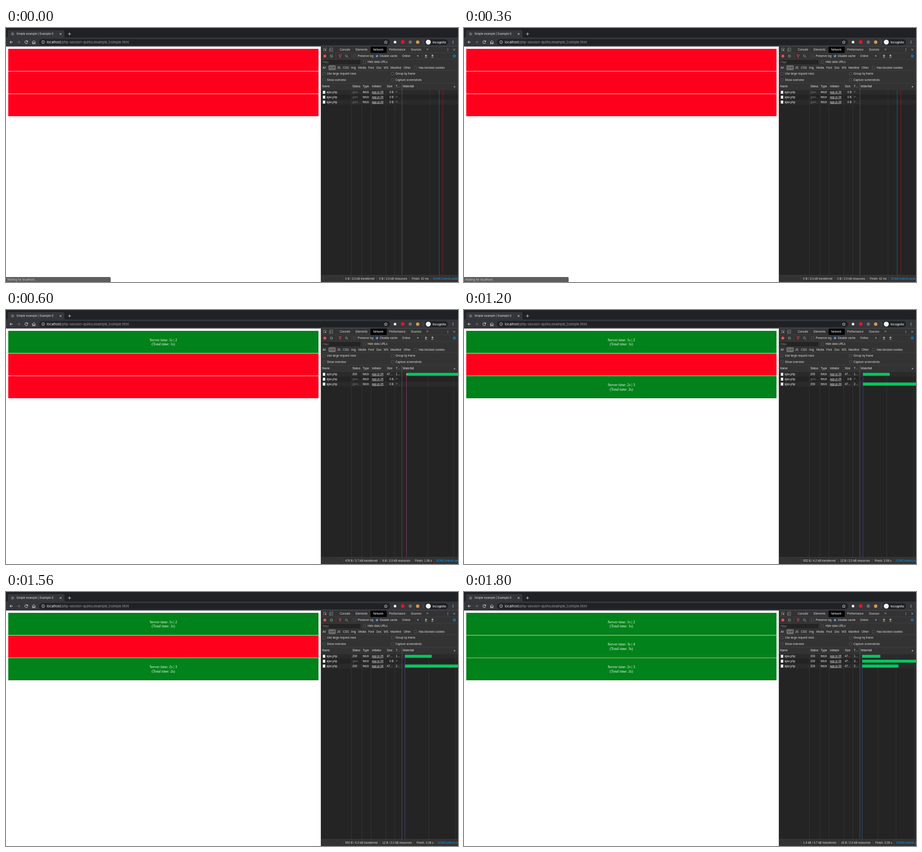
Animation, 998 px wide and 561 px high, one loop 2400 ms. Source, as an HTML page:

```html
<!DOCTYPE html>
<html lang="en">
<head>
<meta charset="utf-8">
<title>Session example</title>
<style>
html, body { margin: 0; width: 100%; height: 100%; overflow: hidden; background: #fff; }
svg { display: block; width: 998px; height: 561px; }
text { white-space: pre; }
.ui { font-family: Inter, sans-serif; }
.dev { font-family: "Liberation Sans", Arial, sans-serif; font-size: 6.28px; }
.page { font-family: "Liberation Serif", Times, serif; font-size: 8.36px; text-anchor: middle; }
.state { opacity: 0; animation: show 2.4s step-end infinite; }
@keyframes show { 0% { opacity: 1; } 25%, 100% { opacity: 0; } }
</style>
</head>
<body>
<svg id="stage" viewBox="0 0 998 561"></svg>
<script>
const rect = (x, y, w, h, fill, r = 0) =>
  `<rect x="${x}" y="${y}" width="${w}" height="${h}" fill="${fill}" rx="${r}"/>`;
const dot = (x, y, r, fill) => `<circle cx="${x}" cy="${y}" r="${r}" fill="${fill}"/>`;
const ring = (x, y, r, color, w = 0.8) =>
  `<circle cx="${x}" cy="${y}" r="${r}" fill="none" stroke="${color}" stroke-width="${w}"/>`;
const line = (d, color, w = 1) =>
  `<path d="${d}" fill="none" stroke="${color}" stroke-width="${w}"/>`;
const shape = (d, fill) => `<path d="${d}" fill="${fill}"/>`;
const text = (x, y, str, fill = '#dcdcdc', cls = 'dev', more = '') =>
  `<text x="${x}" y="${y}" fill="${fill}" class="${cls}" ${more}>${str}</text>`;
const ui = (x, y, str, size, fill, weight = 400) =>
  text(x, y, str, fill, 'ui', `font-size="${size}" font-weight="${weight}"`);
const vline = (x, y1, y2, color, w = 0.7) => rect(x, y1, w, y2 - y1, color);
const dots = (x, y, gap, fill) => [-gap, 0, gap].map(d => dot(x, y + d, 0.75, fill)).join('');
const cross = (x, y, r, color) =>
  line(`M${x - r} ${y - r}l${2 * r} ${2 * r}m0 ${-2 * r}l${-2 * r} ${2 * r}`, color, 0.9);
const box = (x, y) =>
  `<rect x="${x - 2.7}" y="${y - 2.7}" width="5.4" height="5.4" rx=".8" fill="#2c2c2c" stroke="#777" stroke-width=".6"/>`;
const check = (x, y, label) => box(x, y) + text(x + 6.6, y + 2.2, label);

const ICON = '#e8eaed', GREY = '#9aa0a6', DIM = '#7c7c7c', BAR = '#35363a', DARK = '#202124';
const RED = '#ff001c', GREEN = '#02821a', BLUE = '#0b84d8';
const rowY = i => 142 + 10.8 * i;
const boxY = i => 46 + 49.9 * i;

function browser() {
  return rect(0, 0, 998, 21.5, DARK) + rect(0, 21, 998, 19.6, BAR) + rect(0, 40.4, 998, 0.6, '#26272a') +
    shape('M0 21.5q4 0 4-4v-9q0-4 4-4h117q4 0 4 4v9q0 4 4 4z', BAR) +
    dot(14.5, 13.2, 3.4, '#62656a') +
    ui(23, 15.3, 'Simple example | Example 0', 6.15, '#e3e5e8') +
    cross(120.6, 13.1, 2, ICON) + line('M137 13.1h6.4m-3.2-3.2v6.4', ICON, 0.9) +
    line('M15 31.2h-6.4m3.1-3.1l-3.1 3.1l3.1 3.1', ICON) +
    line('M24.6 31.2h6.4m-3.1-3.1l3.1 3.1l-3.1 3.1', '#77797d') +
    line('M47.3 29a3.2 3.2 0 1 0 .6 3.2', ICON) + shape('M48.3 27.4v3.3h-3.3z', ICON) +
    line('M57.3 31.4l4-3.6l4 3.6m-6.8-.6v4.2h2v-2.6h1.7v2.6h2v-4.2', ICON, 0.9) +
    rect(73, 24.4, 775, 13.6, DARK, 6.8) +
    ring(82, 31.2, 3.3, ICON) + rect(81.6, 30.7, 0.8, 2.4, ICON) + rect(81.6, 29.1, 0.8, 0.8, ICON) +
    ui(90, 33.7, `localhost<tspan fill="${GREY}">/php-session-quirks/example_1/simple.html</tspan>`, 7.33, '#f1f3f4') +
    line('M838.6 27.8l1 2.3l2.5.2l-1.9 1.7l.6 2.5l-2.2-1.3l-2.2 1.3l.6-2.5l-1.9-1.7l2.5-.2z', ICON, 0.75) +
    dot(859, 31.2, 2.9, '#f0f0f0') + dot(876, 31.1, 4, '#e5122b') +
    dot(892.6, 31.2, 3.6, '#6b6d70') + dot(909, 31.2, 3.7, '#d99a4a') +
    vline(920.7, 26.5, 36, '#5c5e62') +
    rect(925, 24.4, 51, 13.6, DARK, 6.8) + dot(932.4, 31.2, 5.5, '#f1f3f4') +
    ui(942, 33.6, 'Incognito', 6.65, '#f1f3f4', 500) + dots(987, 31.2, 2.4, ICON);
}

function toolbars() {
  const tabs = [[737, 'Console'], [772, 'Elements'], [846, 'Performance'], [894, 'Sources']];
  const types = [[699, 'All'], [731, 'JS'], [744, 'CSS'], [762, 'Img'], [778, 'Media'], [800, 'Font'],
    [818, 'Doc'], [834, 'WS'], [849, 'Manifest'], [878, 'Other']];
  const put = y => ([x, s]) => text(x, y, s);
  const C = '#a8a8a8';
  return rect(695, 41, 303, 520, '#333') + rect(695, 41, 0.8, 520, '#4c4c4c') +
    [55, 69, 94, 122].map(y => rect(695.8, y - 0.3, 303, 0.6, '#464646')).join('') +
    line('M703 50.7h-1.7v-6h6v1.8', C, 0.7) + shape('M703.7 46.7l4 1.5l-1.7.8l1.3 1.6l-.8.6l-1.2-1.7l-1 1.2z', C) +
    line('M715.2 47.5v-3.2h6v7h-2', C, 0.7) + line('M714.2 47.4h3.6v4.2h-3.6z', C, 0.7) +
    rect(805, 41, 35.5, 14, '#000') + text(810.5, 50.2, 'Network', '#fff') +
    tabs.map(put(50.2)).join('') + text(928, 50, '»', C, 'dev', 'style="font-size:9px"') +
    dots(975.5, 48, 2.2, C) + cross(989.7, 47.9, 2.2, C) +
    dot(704, 62, 3.2, '#ee4b55') + ring(718.5, 62, 2.8, C) + line('M716.6 60.1l3.8 3.8', C, 0.8) +
    vline(728, 57.5, 66.5, '#4a4a4a') +
    line('M734.6 59.2h6.2l-2.3 2.9v3l-1.6-.8v-2.2z', '#ee4b55', 0.9) +
    ring(751.3, 61.3, 2.2, C) + line('M753 63l2.4 2.4', C) + vline(763, 57.5, 66.5, '#4a4a4a') +
    check(769.8, 61.9, 'Preserve log') +
    rect(816.2, 59, 5.8, 5.8, '#2f6fb5', 0.8) + line('M817.5 62l1.2 1.3l2.1-3', '#fff', 0.8) +
    text(825.2, 64.1, 'Disable cache') + text(874.6, 64.1, 'Online') +
    shape('M907.2 60.5h4.2l-2.1 3.2z', C) + vline(918, 57.5, 66.5, '#4a4a4a') +
    shape('M927.3 58.4l3 3.2h-1.9v2h-2.2v-2h-1.9zM924.6 64.5h5.4v.9h-5.4z', C) +
    shape('M941.6 63.6l3-3.2h-1.9v-2h-2.2v2h-1.9zM938.9 64.5h5.4v.9h-5.4z', C) +
    ring(989.8, 61.8, 2, BLUE, 1.3) +
    `<circle cx="989.8" cy="61.8" r="3.1" fill="none" stroke="${BLUE}" stroke-width="1.2" stroke-dasharray="1.2 1.235"/>` +
    rect(697, 70.4, 85.5, 9.8, '#242424') + text(699, 77.6, 'Filter', '#858585') +
    check(791.6, 75.2, 'Hide data URLs') +
    rect(712, 82.6, 16, 10.2, '#747474', 2) + text(713.6, 90, 'XHR', '#292929') +
    vline(708.7, 84, 92, '#484848', 0.5) + types.map(put(90)).join('') +
    check(904.6, 87.7, 'Has blocked cookies') +
    check(702, 101, 'Use large request rows') + check(853.5, 101, 'Group by frame') +
    check(702, 114.6, 'Show overview') + check(853.5, 114.6, 'Capture screenshots');
}

function table() {
  const heads = [[698, 'Name'], [764.7, 'Status'], [787.8, 'Type'], [808, 'Initiator'], [841, 'Size'],
    [860.7, 'T…'], [876, 'Waterfall']];
  let out = rect(695.8, 136.6, 303, 409.4, '#242424') + rect(695.8, 136.2, 303, 0.6, '#484848');
  for (let i = 0; i < 3; i++) {
    const y = rowY(i);
    out += rect(695.8, y - 5.4, 303, 10.8, i % 2 ? '#232323' : '#2a2a2a') +
      rect(699.6, y - 3.3, 5.2, 6.6, '#f4f4f4') + text(707.8, y + 2.1, 'ajax.php', '#eee') +
      text(787.8, y + 2.1, 'fetch', '#eee') +
      text(808, y + 2.1, 'app.js:26', '#e4e4e4', 'dev', 'text-decoration="underline"');
  }
  return out + heads.map(([x, s]) => text(x, 131.3, s, '#e4e4e4')).join('') +
    shape('M988.3 130.9h4l-2-3.6z', '#a0a0a0') +
    [762, 785, 805.6, 838, 858].map(x => vline(x, 122.5, 546, '#3b3b3b')).join('') +
    vline(873.8, 122.5, 546, '#6a6a6a') +
    rect(695.8, 546, 303, 15, '#333') + rect(695.8, 545.7, 303, 0.6, '#484848');
}

// done: per box, seconds taken and reply number; null while pending
const first = [1, 2], second = [3, 4], third = [2, 3];
const states = [
  { done: [null, null, null], grid: [935.8], marks: [[956, '#0a72bd'], [964.3, '#a3161c']],
    foot: [['0 B / 3.3 kB transferred', 749], ['0 B / 2.0 kB resources', 824], ['Finish: 42 ms', 896]], load: 942.5 },
  { done: [first, null, null], start: 884.5, unit: 114, grid: [930.8, 987.8],
    marks: [[883.7, '#3b4fa0'], [884.2, '#a02a48']],
    foot: [['476 B / 3.7 kB transferred', 749], ['6 B / 2.0 kB resources', 831], ['Finish: 1.08 s', 903]], load: 949.5 },
  { done: [first, null, third], start: 881, unit: 59, grid: [933, 992.5], marks: [[880.5, '#4a4aa8']],
    foot: [['952 B / 4.2 kB transferred', 749], ['12 B / 2.0 kB resources', 831], ['Finish: 2.08 s', 906.5]], load: 953 },
  { done: [first, second, third], start: 879.3, unit: 40, grid: [913.3, 953.7, 994], marks: [[878.7, '#2c5ea8']],
    foot: [['1.4 kB / 4.7 kB transferred', 749], ['18 B / 2.0 kB resources', 832.5], ['Finish: 3.09 s', 908]], load: 954.5 }
];

function reply(i, [secs, n]) {
  const y = boxY(i);
  return rect(5, y, 685, 49, GREEN) +
    text(347.5, y + 22.5, `Server time: ${secs}s | ${n}`, '#fff', 'page') +
    text(347.5, y + 32, `(Total time: ${secs}s)`, '#fff', 'page');
}

function cells(i, done) {
  const y = rowY(i) + 2.1, end = 'text-anchor="end"';
  return done
    ? text(764.7, y, '200', '#eee') + text(854, y, '47…', '#eee', 'dev', end) + text(860.7, y, done[0] + '…', '#eee')
    : text(764.7, y, '(pen…', DIM) + text(856, y, '0 B', '#eee', 'dev', end) + text(860.7, y, 'P…', DIM);
}

function drawState(s, k) {
  let out = s.grid.map(x => vline(x, 137, 545.7, '#3b3b3b')).join('') +
    s.marks.map(([x, c]) => vline(x, 137, 545.7, c, 0.8)).join('');
  s.done.forEach((d, i) => {
    out += cells(i, d);
    if (!d) return;
    const end = Math.min(998, s.start + s.unit * d[0]);
    const x = s.start + (k === 1 ? 1.2 : 0);
    out += reply(i, d) + rect(x, rowY(i) - 3.3, end - x, 6.6, '#04c75e', 0.8);
    if (k === 1) out += rect(884.1, rowY(i) - 2, 1.6, 4, '#ddd');
  });
  out += s.foot.map(([str, x]) => vline(x - 5.3, 549.5, 557.5, '#505050') + text(x, 555.8, str)).join('') +
    vline(s.load - 5.3, 549.5, 557.5, '#505050') + text(s.load, 555.8, 'DOMContentLoaded: 36 ms', '#0d9bea');
  if (k === 0) out += shape('M0 550h228.5q2.5 0 2.5 2.5v8.5h-231z', '#5c5d5f') +
    ui(2.6, 557.9, 'Waiting for localhost…', 6.24, '#c9cbce');
  return `<g class="state" style="animation-delay:${(k - 4) * 0.6}s">${out}</g>`;
}

document.getElementById('stage').innerHTML = rect(0, 0, 998, 561, '#fff') + browser() +
  [0, 1, 2].map(i => rect(5, boxY(i), 685, 49, RED)).join('') +
  toolbars() + table() + states.map(drawState).join('');
</script>
</body>
</html>
```
